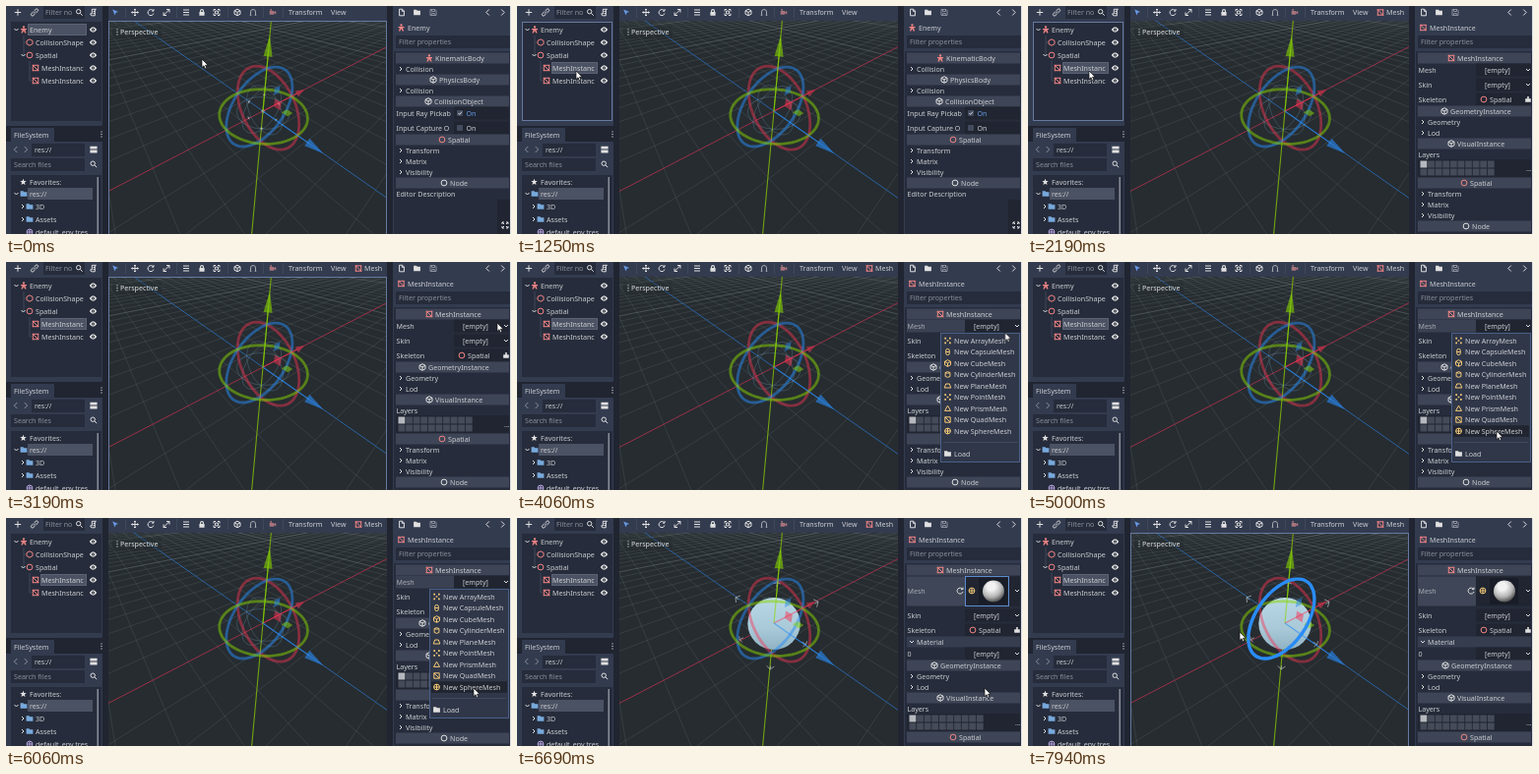
These frames come from a looping animation (513x232 px, 8 s). An HTML page:

```html
<!DOCTYPE html>
<html lang="en">
<head>
<meta charset="utf-8">
<title>Adding a sphere mesh</title>
<style>
html, body { margin: 0; width: 100%; height: 100%; overflow: hidden; background: #202531; }
svg { display: block; }
text { font: 7.1px "Noto Sans", "Open Sans", sans-serif; white-space: pre; }
#hover { animation: hover 8s step-end infinite; }
#cursor { animation: move 8s linear infinite; }
@keyframes hover {
  0%, 51.46% { transform: translateY(0); animation-timing-function: steps(5); }
  58.29% { transform: translateY(57.5px); }
  60.22% { transform: translateY(69px); }
  61.12% { transform: translateY(80.5px); }
  62.05%, 100% { transform: translateY(92px); }
}
@keyframes move {
  0%, 2.4% { transform: translate(199px, 54px); animation-timing-function: ease-in-out; }
  11%, 26.9% { transform: translate(60px, 66px); animation-timing-function: ease-in-out; }
  36.75% { transform: translate(470px, 59px); }
  39.87%, 49.5% { transform: translate(499px, 62px); }
  57.87% { transform: translate(477px, 127px); }
  59.4%, 60% { transform: translate(476px, 142px); }
  62.5%, 66% { transform: translate(476px, 172px); }
  67.25%, 70% { transform: translate(466px, 172px); }
  71.1%, 73% { transform: translate(490px, 172px); }
  75.75%, 92.4% { transform: translate(475px, 173px); animation-timing-function: ease-in-out; }
  99.25%, 100% { transform: translate(215px, 116px); }
}
</style>
<style id="spans"></style>
</head>
<body>
<svg id="stage" width="513" height="232" viewBox="0 0 513 232"></svg>
<script>
const BASE = '#333b4f', DARK = '#262c3b', DEEP = '#202531', INK = '#cdcfd2', DIM = '#8b909c';
const RED = '#f28585', GOLD = '#f5cb78', BLUE = '#699ce8', FOCUS = '#66799f';
const AXIS = { x: '#f53352', y: '#87d603', z: '#298cf5' };

// Icons are centred on 0,0.
const LINE = {
  ring: 'M-2.9 0a2.9 2.9 0 1 0 5.8 0a2.9 2.9 0 1 0-5.8 0',
  mesh: 'M-2.7-2.7h5.4v5.4h-5.4zM-2.7-2.7l5.4 5.4M-3.3-2.7h1.2M2.1-2.7h1.2M-3.3 2.7h1.2M2.1 2.7h1.2',
  cube: 'M0-3.3l3 1.6v3.4l-3 1.6l-3-1.6v-3.4zM-3-1.7l3 1.6l3-1.6M0 0v3.2',
  shape: 'M-3-1.6l3-1.6l3 1.6v3.2l-3 1.6l-3-1.6z',
  right: 'M-1-2l2 2l-2 2', down: 'M-2-1l2 2l2-2',
  prev: 'M1.3-3l-3 3l3 3', next: 'M-1.3-3l3 3l-3 3',
  plus: 'M-3.2 0h6.4M0-3.2v6.4',
  link: 'M-.5-1.5l1.7-1.6a1.4 1.4 0 0 1 2 2l-1.7 1.6M.5 1.5l-1.7 1.6a1.4 1.4 0 0 1-2-2l1.7-1.6M-1 1l2-2',
  script: 'M-1.7-3.2h4.5M-1.7-3.2v4.5h-1.5q0 2 1.5 2h3v-6.5M-.5-1h1.5M-.5 1h1.5',
  find: 'M-3-.8a2.2 2.2 0 1 0 4.4 0a2.2 2.2 0 1 0-4.4 0M1 1l2.2 2.2',
  move: 'M-3.6 0h7.2M0-3.6v7.2M-1-2.5l1-1l1 1M-1 2.5l1 1l1-1M-2.5-1l-1 1l1 1M2.5-1l1 1l-1 1',
  turn: 'M2.6-1.6a3 3 0 1 0 .4 2.6M3-3.4v2h-2',
  scale: 'M-3 0v3h3M3 0v-3h-3M-2.8 2.8l5.6-5.6',
  list: 'M-3-2.5h6M-3 0h6M-3 2.5h6',
  group: 'M-3-1v-2h2M1-3h2v2M3 1v2h-2M-1 3h-2v-2M-1.4-1.4h2.8v2.8h-2.8z',
  snap: 'M-2.5 3v-3.5a2.5 2.5 0 0 1 5 0v3.5M-3.3 2.8h1.6M1.7 2.8h1.6',
  file: 'M-2.4-3.3h3l1.8 1.8v4.8h-4.8zM.4-3v1.8h1.8',
  save: 'M-3-3h5l1 1v5h-6zM-1.5-3v2h3v-2M-1.3 3v-2h2.6v2',
  plane: 'M-1.8-2h3.6l1.5 4h-6.6z', prism: 'M0-2.8l3 5.2h-6z', quad: 'M-2.7-2.7h5.4v5.4h-5.4zM-2.7-2.7l5.4 5.4',
  sphere: 'M-2.9 0a2.9 2.9 0 1 0 5.8 0a2.9 2.9 0 1 0-5.8 0M-2.9 0h5.8M0-2.9v5.8',
  tube: 'M-2.4-2v4q2.4 1.6 4.8 0v-4q-2.4-1.6-4.8 0q2.4 1.6 4.8 0', pill: 'M-1.8-1.3a1.8 1.8 0 0 1 3.6 0v2.6a1.8 1.8 0 0 1-3.6 0zM-1.8 0h3.6',
  check: 'M-1.6 0l1.2 1.4l2.4-2.8', grow: 'M-1-1l-2-2M1-1l2-2M-1 1l-2 2M1 1l2 2M-3-1v-2h2M1-3h2v2M3 1v2h-2M-1 3h-2v-2',
};
const SOLID = {
  body: 'M-1.2-2.6a1.2 1.2 0 1 1 2.4 0a1.2 1.2 0 1 1-2.4 0M-3-1h6v1.2h-1.6l1.2 3.4h-1.5l-1.1-2.6l-1.1 2.6h-1.5l1.2-3.4h-1.6z',
  eye: 'M-3.8 0q3.8-5.6 7.6 0q-3.8 5.6-7.6 0zM-1.5 0a1.5 1.5 0 1 0 3 0a1.5 1.5 0 1 0-3 0M-.6 0a.6.6 0 1 1 1.2 0a.6.6 0 1 1-1.2 0',
  folder: 'M-3.4-2.8h2.8l1 1.1h3v4.5h-6.8z',
  star: 'M0-3.2l.9 2.1l2.3.2l-1.7 1.5l.5 2.3l-2-1.2l-2 1.2l.5-2.3l-1.7-1.5l2.3-.2z',
  lock: 'M-2.6-.4h.6v-1a2 2 0 0 1 4 0v1h.6v3.6h-5.2zM-.9-.4h1.8v-1a.9.9 0 0 0-1.8 0z',
  pick: 'M-2.8-3l6 2.4l-2.7.9l-.9 2.7z', camera: 'M-3.3-1.6h4.4v1.2l2.2-1.2v3.6l-2.2-1.2v1.4h-4.4zM-2.6-3.4h1.6v1.6h-1.6z',
  dots: 'M-.6-3.1h1.2v1.2h-1.2zM-.6-.6h1.2v1.2h-1.2zM-.6 1.9h1.2v1.2h-1.2z',
  points: 'M-3.2-3.2h1.7v1.7h-1.7zM1.5-3.2h1.7v1.7h-1.7zM-.8-.8h1.6v1.6h-1.6zM-3.2 1.5h1.7v1.7h-1.7zM1.5 1.5h1.7v1.7h-1.7z',
  split: 'M-3.6-3.2h7.2v2.8h-7.2zM-3.6.6h7.2v2.8h-7.2z', tool: 'M-.8-3h1.6v2.2h2v3.6h-5.6v-3.6h2z',
};

const text = (x, y, s, c = INK) => `<text x="${x}" y="${y + 2.5}" fill="${c}">${s}</text>`;
const rect = (x, y, w, h, c, more = '') => `<rect x="${x}" y="${y}" width="${w}" height="${h}" fill="${c}" ${more}/>`;
const frame = (x, y, w, h, c) => rect(x + .5, y + .5, w - 1, h - 1, 'none', `stroke="${c}"`);
const line = (d, c, w = 1, more = '') => `<path d="${d}" fill="none" stroke="${c}" stroke-width="${w}" ${more}/>`;
const fill = (d, c, more = '') => `<path d="${d}" fill="${c}" ${more}/>`;
const icon = (name, x, y, c = '#e0e0e0') => {
  const at = `transform="translate(${x} ${y})"`;
  return SOLID[name] ? fill(SOLID[name], c, at + ' fill-rule="evenodd"') : line(LINE[name], c, 1, at);
};

// Shows a group during [from, to] pairs of milliseconds.
let css = '', spans = 0;
const during = (times, html) => {
  const id = 'span' + spans++;
  const keys = times.map((t, i) => `${t / 80}%{visibility:${i % 2 ? 'hidden' : 'visible'}}`).join('');
  css += `@keyframes ${id}{0%{visibility:hidden}${keys}}`;
  return `<g style="animation:${id} 8s step-end infinite">${html}</g>`;
};

// Perspective from the three vanishing points of the world axes.
const project = (x, y, z) => {
  const a = x * .0756, b = y * -.108, c = z * -.0937, w = 1 + a + b + c;
  return [(261 + a * 519 + b * 243 + c * 70) / w, (107 - a * 27 + b * 305 - c * 27) / w];
};
const join = pts => 'M' + pts.map(p => p.map(v => v.toFixed(1)).join(' ')).join('L');
const edge = (p, q) => join([project(...p), project(...q)]);

function grid() {
  let thin = '', thick = '';
  for (let i = -50; i <= 50; i++) {
    if (!i) continue;
    const x0 = Math.max(-50, (i * .0937 - .9) / .0756), z1 = Math.min(50, (.9 + i * .0756) / .0937);
    let d = '';
    if (x0 < 50) d += edge([x0, 0, i], [50, 0, i]);
    if (z1 > -50) d += edge([i, 0, -50], [i, 0, z1]);
    if (i % 10) thin += d; else thick += d;
  }
  return line(thin, '#8f9a9e', .6, 'opacity=".27"') + line(thick, '#9aa5a9', .7, 'opacity=".45"')
    + line(edge([-11.8, 0, 0], [50, 0, 0]), '#a8324a', .9) + line(edge([0, 0, -50], [0, 0, 9.5]), '#2c68ad', .9)
    + line(edge([0, -50, 0], [0, 8, 0]), '#74a312', 1.1);
}

const AT = { x: v => [v, 0, 0], y: v => [0, v, 0], z: v => [0, 0, v] };
const AROUND = { x: (u, v) => [0, u, v], y: (u, v) => [u, 0, v], z: (u, v) => [u, v, 0] };

function circle(k, r) {
  const pts = Array.from({ length: 64 }, (_, i) => {
    const t = i / 32 * Math.PI;
    return project(...AROUND[k](r * Math.cos(t), r * Math.sin(t)));
  });
  return join(pts) + 'Z';
}
const ring = (k, w, opacity) => line(circle(k, 1.66), AXIS[k], w, `opacity="${opacity}"`);

function arrow(k, half, opacity) {
  const [bx, by] = project(...AT[k](2.03)), [tx, ty] = project(...AT[k](2.6));
  const n = Math.hypot(tx - bx, ty - by), ux = (by - ty) / n * half, uy = (tx - bx) / n * half;
  return line(edge([0, 0, 0], AT[k](2.1)), AXIS[k], 1.2, `opacity="${opacity}"`)
    + fill(join([[bx + ux, by + uy], [tx, ty], [bx - ux, by - uy]]) + 'Z', AXIS[k], `opacity="${opacity}"`);
}

function handle(k) {
  const pts = [[.5, .5], [.8, .5], [.8, .8], [.5, .8]].map(p => project(...AROUND[k](...p)));
  return fill(join(pts) + 'Z', AXIS[k], 'opacity=".5"');
}

function corners(r) {
  let d = '';
  for (const x of [-r, r]) for (const y of [-r, r]) for (const z of [-r, r])
    d += edge([x, y, z], [x * .8, y, z]) + edge([x, y, z], [x, y * .8, z]) + edge([x, y, z], [x, y, z * .8]);
  return line(d, '#c9d0d2', .8, 'opacity=".8"');
}

function viewport() {
  const ball = corners(1) + '<circle cx="261" cy="107.5" r="26.6" fill="url(#sky)"/>';
  const tools = [['pick', 111, BLUE], ['move', 131], ['turn', 147], ['scale', 163], ['list', 183], ['lock', 199],
    ['group', 214], ['cube', 235], ['snap', 251, '#a4a8b0'], ['camera', 271, '#a8747c']];
  return rect(104, 0, 283, 15, BASE) + tools.map(([n, x, c]) => icon(n, x, 6.5, c)).join('')
    + [121, 173, 225, 261, 281].map(x => rect(x, 1, .6, 11, '#4a5266')).join('')
    + text(287, 6.5, 'Transform') + text(330, 6.5, 'View')
    + during([1310, 8000], icon('mesh', 358, 6.5, RED) + text(364, 6.5, 'Mesh'))
    + `<g clip-path="url(#view)">${rect(104, 15, 283, 217, '#262c30')}${grid()}`
    + line(circle('x', 1) + circle('y', 1) + circle('z', 1), '#7fb0d0', .7, 'opacity=".35"')
    + during([0, 1250], corners(.4)) + during([6630, 8000], ball)
    + ring('x', 2.8, .45) + during([0, 7880], ring('z', 2.8, .5)) + ring('y', 2.8, .5)
    + 'xyz'.split('').map(handle).join('') + arrow('x', 3.4, .5) + arrow('y', 4.6, .6) + arrow('z', 4.6, .6)
    + during([7880, 8000], ring('z', 3.4, 1)) + '</g>'
    + rect(108, 20, 50, 13, '#1b2026', 'rx="2" opacity=".25"') + icon('dots', 113, 26.5) + text(116, 26.5, 'Perspective', '#e0e0e0')
    + during([0, 1250, 2250, 3560, 7560, 8000], frame(104, 15, 283, 218, FOCUS));
}

function sceneDock() {
  const rows = [['body', 18, 'Enemy'], ['shape', 24, 'CollisionShape'], ['ring', 24, 'Spatial'], ['mesh', 30, 'MeshInstanc'], ['mesh', 30, 'MeshInstanc']];
  const pick = (x, y) => rect(x, y - 6, 82 - x, 12, '#4b5263') + frame(x, y - 6, 82 - x, 12, '#5b6273');
  return rect(0, 0, 98, 122, BASE) + icon('plus', 12, 6.5) + icon('link', 29, 6.5)
    + rect(38, 0, 42, 13, DARK) + text(40, 6.5, 'Filter no', DIM) + icon('find', 74.5, 6.5) + icon('script', 89, 6.5)
    + rect(5, 16, 92, 101, DARK) + line('M18 30V50M24 56V76M18 37h2M24 63h2M24 76h2', '#4d5364', .7)
    + during([0, 1250], pick(22, 24)) + during([1250, 8000], pick(35, 63))
    + icon('down', 10.5, 24) + icon('down', 17.5, 50)
    + rows.map(([n, x, s], i) => icon(n, x, 24 + i * 13, RED) + text(x + 6, 24 + i * 13, s) + icon('eye', 88.5, 24 + i * 13)).join('')
    + during([1250, 2250], frame(5, 16, 92, 101, FOCUS));
}

function fileDock() {
  const folder = '#78a9dc';
  return rect(0, 122, 98, 16, DEEP) + rect(5, 124, 44, 14, BASE) + text(8, 131, 'FileSystem') + icon('dots', 97, 130.5)
    + rect(0, 138, 98, 94, BASE) + icon('prev', 10, 146, DIM) + icon('next', 20, 146, DIM)
    + rect(26, 140, 54, 13, DARK) + text(29, 146, 'res://') + icon('split', 89, 146)
    + rect(5, 155, 75, 13, DARK) + text(8, 161, 'Search files', DIM) + icon('find', 89, 161)
    + rect(5, 172, 92, 60, DARK) + rect(92.5, 174, 1.5, 58, DIM) + icon('star', 17.5, 179) + text(24, 179, 'Favorites:')
    + rect(22, 185, 66, 12, '#4b5263') + icon('down', 10.5, 191) + icon('folder', 18, 191, folder) + text(24, 191, 'res://')
    + ['3D', 'Assets'].map((s, i) => icon('right', 17, 204 + i * 13) + icon('folder', 24, 204 + i * 13, folder) + text(30, 204 + i * 13, s)).join('')
    + icon('sphere', 24, 230, '#b7a4e0') + text(30, 230, 'default_env.tres');
}

const category = (y, name, s, x, c) => rect(396, y - 5.5, 115, 11, '#3e4556') + icon(name, x, y, c) + text(x + 6, y, s);
const section = (y, s) => icon('right', 401, y) + text(406, y, s);
const field = (y, label, value = '[empty]') => text(396.5, y, label) + rect(455, y - 6.5, 56, 13, DEEP)
  + text(464, y, value) + icon('down', 508, y);
const skeleton = y => text(396.5, y, 'Skeleton') + rect(455, y - 6.5, 56, 13, DEEP) + icon('ring', 463, y, RED) + text(469, y, 'Spatial') + icon('tool', 508, y);
const toggle = (y, label, on) => text(396.5, y, label) + rect(455, y - 6.5, 56, 13, DEEP)
  + rect(458, y - 3, 6, 6, '#434b5e', 'rx="1"') + (on ? icon('check', 461, y, '#d5dbe8') : '') + text(467.5, y, 'On', on ? BLUE : INK);
const layers = y => {
  let s = text(396.5, y, 'Layers') + rect(396, y + 5, 115, 18, DEEP);
  for (let i = 0; i < 20; i++)
    s += rect(398.5 + i % 10 * 7.6, y + 6.5 + (i / 10 | 0) * 8, 6.8, 7, i ? '#454b58' : '#b5b8bd');
  return s + text(506, y + 14, '...');
};
const geometry = (y, x) => category(y, 'cube', 'GeometryInstance', x) + section(y + 11, 'Geometry') + section(y + 22, 'Lod')
  + category(y + 33, 'cube', 'VisualInstance', 430) + layers(y + 44) + category(y + 73, 'ring', 'Spatial', 443, RED);
const spatial = y => ['Transform', 'Matrix', 'Visibility'].map((s, i) => section(y + i * 11, s)).join('');

function inspector() {
  const title = (name, s) => icon(name, 401.5, 22, RED) + text(408, 22, s);
  const meshTop = title('mesh', 'MeshInstance') + category(53, 'mesh', 'MeshInstance', 430, RED);
  const bodyRows = title('body', 'Enemy') + category(53, 'body', 'KinematicBody', 430, RED) + section(64, 'Collision')
    + category(75, 'cube', 'PhysicsBody', 434) + section(86, 'Collision') + category(97, 'cube', 'CollisionObject', 429)
    + toggle(109, 'Input Ray Pickab', true) + toggle(124, 'Input Capture O', false)
    + category(136, 'ring', 'Spatial', 443, RED) + spatial(147) + category(180, 'ring', 'Node', 445)
    + text(396.5, 191, 'Editor Description') + rect(499, 197, 14, 35, DEEP) + icon('grow', 507, 223);
  const emptyRows = meshTop + field(65, 'Mesh') + field(80, 'Skin') + skeleton(95) + geometry(107, 423)
    + spatial(191) + category(224, 'ring', 'Node', 445);
  const filledRows = meshTop + rect(396, 59.5, 59, 30, '#3e4657') + text(396.5, 74, 'Mesh', '#a9adb5') + icon('turn', 450, 74)
    + rect(455, 59.5, 56, 30, DEEP) + icon('sphere', 462, 74, GOLD) + rect(469, 61, 29, 27, '#191d27')
    + '<circle cx="484" cy="74.5" r="11" fill="url(#shade)"/>' + icon('down', 508, 74)
    + during([6630, 7560], frame(455, 59, 45, 31, '#5d8bcf'))
    + field(99, 'Skin') + skeleton(114) + rect(396, 120.5, 115, 11, '#353d4f') + icon('down', 401, 126) + text(406, 126, 'Material')
    + field(138, '0') + geometry(150, 424) + section(234, 'Transform');
  return rect(393, 0, 120, 232, BASE) + icon('file', 402, 6.5) + icon('folder', 417.5, 6.5) + icon('save', 434, 6.5, DIM)
    + icon('prev', 489.5, 6.5) + icon('next', 504.5, 6.5)
    + rect(396, 30, 117, 13, DARK) + text(399, 36.5, 'Filter properties', DIM) + rect(394, 46, 119, 186, DARK)
    + during([0, 1310], bodyRows) + during([1310, 6630], emptyRows) + during([6630, 8000], filledRows)
    + rect(512, 0, 1, 232, '#d9dce2');
}

function popup() {
  const kinds = ['points Array', 'pill Capsule', 'cube Cube', 'tube Cylinder', 'plane Plane', 'points Point', 'prism Prism', 'quad Quad', 'sphere Sphere'];
  const items = kinds.map((k, i) => {
    const [name, s] = k.split(' '), y = 80 + i * 11.5;
    return icon(name, 437.5, y, GOLD) + text(444, y, `New ${s}Mesh`);
  });
  return during([3560, 6630], rect(396, 59, 59, 12.5, '#3a4152') + text(396.5, 65, 'Mesh', '#a9adb5')
    + rect(430, 72, 81, 132, '#303749') + frame(430, 72, 81, 132, '#4a5f88') + rect(433, 183, 75, .7, '#4a5266')
    + during([4117, 6630], rect(432, 74.3, 77, 11.5, '#20252f', 'id="hover"'))
    + items.join('') + icon('folder', 437.5, 195) + text(444, 195, 'Load'));
}

const defs = `<defs><clipPath id="view">${rect(104, 15, 283, 217, '#000')}</clipPath>
  <linearGradient id="sky" x2="0" y2="1"><stop stop-color="#b9d8e6"/><stop offset=".6" stop-color="#a9c9d8"/><stop offset="1" stop-color="#8fb2c2"/></linearGradient>
  <radialGradient id="shade" cx=".4" cy=".28" r=".75"><stop offset=".25" stop-color="#f2f2f2"/><stop offset=".65" stop-color="#b4b4b4"/><stop offset="1" stop-color="#484848"/></radialGradient></defs>`;
const cursor = fill('M0 0v8.6l2-1.9l1.3 3l1.5-.6l-1.3-2.9h2.7z', '#fff', 'id="cursor" stroke="#111" stroke-width=".7"');

document.getElementById('stage').innerHTML = defs + rect(0, 0, 513, 232, DEEP) + sceneDock() + fileDock()
  + rect(98, 0, 6, 232, DEEP) + viewport() + rect(387, 0, 6, 232, DEEP) + inspector() + popup() + cursor;
document.getElementById('spans').textContent = css;
</script>
</body>
</html>
```
